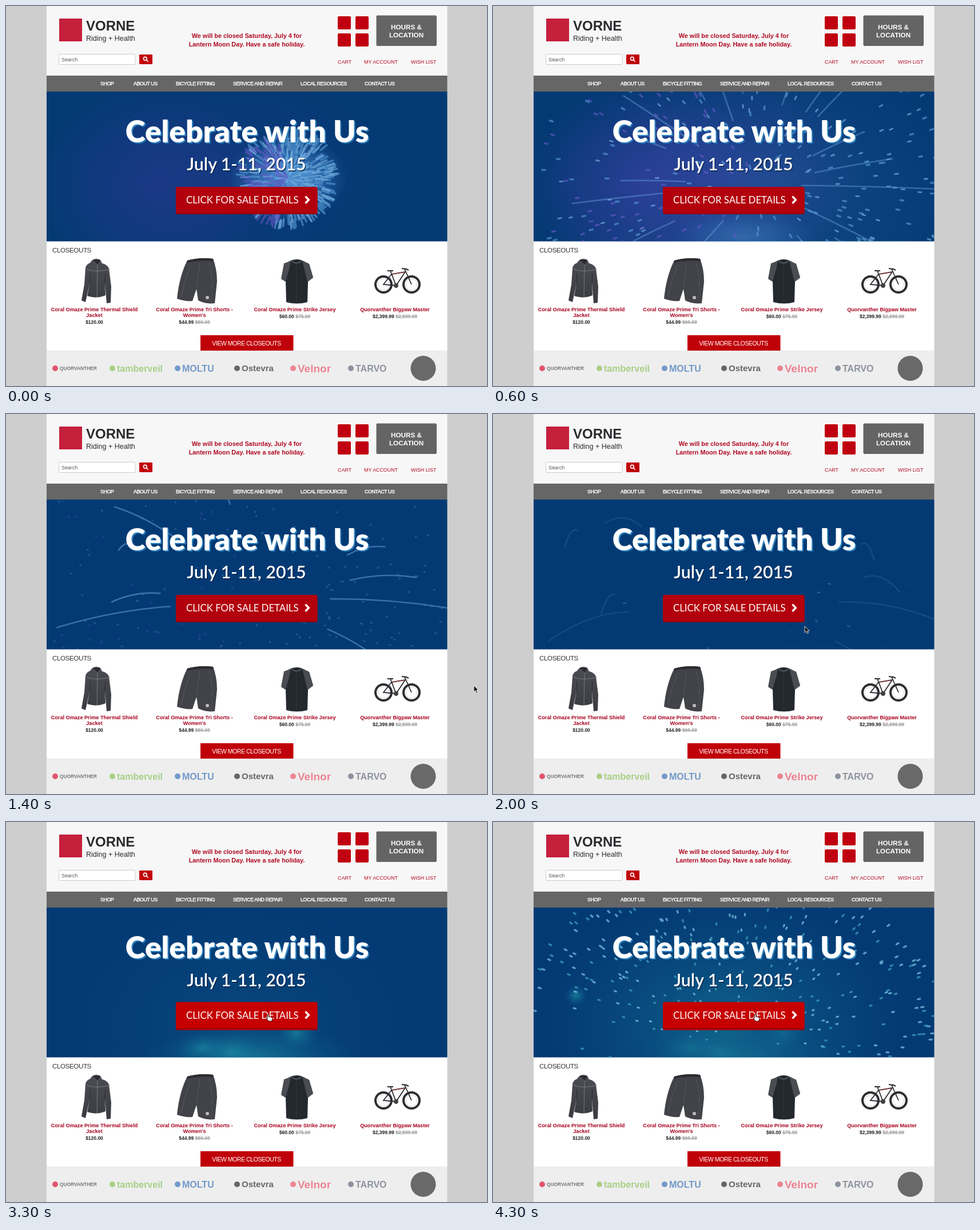
An HTML page for the animation above (4.4 s loop, 841 by 666 pixels).

```html
<!DOCTYPE html>
<html lang="en">
<head>
<meta charset="utf-8">
<title>Shop page</title>
<style>
html, body { margin: 0; width: 100%; height: 100%; overflow: hidden; background: #cecece; }
svg { display: block; position: absolute; left: 0; top: 0; }
text { font-family: "Liberation Sans", Arial, sans-serif; white-space: pre; }
.mid { text-anchor: middle; }
.b { font-weight: 700; }
.red { fill: #b00a22; }
.link { font-size: 8.9px; fill: #b00a22; }
.nav { font-size: 8.9px; letter-spacing: -.45px; fill: #fff; stroke: #fff; stroke-width: .4px; }
.item { font-size: 9.15px; font-weight: 700; fill: #a8001c; text-anchor: middle; }
.price { font-size: 8.5px; font-weight: 700; fill: #222; text-anchor: middle; }
.old { fill: #999; text-decoration: line-through; }
.lato { font-family: Lato, "Open Sans", sans-serif; }
.title { font-size: 53.1px; font-weight: 900; text-anchor: middle; }
.date { font-size: 30.3px; font-weight: 600; text-anchor: middle; }
#fire path { fill: none; stroke-linecap: round; }
</style>
</head>
<body>
<svg width="841" height="666" viewBox="0 0 841 666">
  <defs>
    <clipPath id="hero"><rect x="71" y="150" width="700.5" height="262.5"/></clipPath>
    <radialGradient id="gBlue"><stop offset="0" stop-color="#5a9ade"/><stop offset=".5" stop-color="#4585cc" stop-opacity=".65"/><stop offset="1" stop-color="#2f6fb8" stop-opacity="0"/></radialGradient>
    <radialGradient id="gViolet"><stop offset="0" stop-color="#4236a6"/><stop offset=".55" stop-color="#38379c" stop-opacity=".65"/><stop offset="1" stop-color="#303a94" stop-opacity="0"/></radialGradient>
    <radialGradient id="gTeal"><stop offset="0" stop-color="#1f93a8"/><stop offset=".5" stop-color="#15789a" stop-opacity=".55"/><stop offset="1" stop-color="#0d5f8c" stop-opacity="0"/></radialGradient>
    <linearGradient id="cloth" x2="0" y2="1"><stop offset="0" stop-color="#4b4d53"/><stop offset="1" stop-color="#3a3b41"/></linearGradient>
  </defs>

  <rect width="841" height="666" fill="#cecece"/>
  <rect x="71" width="700.5" height="122" fill="#f7f7f7"/>
  <rect x="71" y="122" width="700.5" height="28" fill="#666"/>
  <rect x="71" y="412" width="700.5" height="192" fill="#fff"/>
  <rect x="71" y="603.5" width="700.5" height="63" fill="#eee"/>

  <!-- header -->
  <rect x="93" y="22" width="40" height="40" fill="#c4203c"/>
  <text class="b" x="140" y="43" font-size="24" fill="#2b2b2f">VORNE</text>
  <text x="140" y="61" font-size="12.5" fill="#2b2b2f">Riding + Health</text>
  <rect x="92.5" y="84.5" width="133.5" height="18" rx="1" fill="#fff" stroke="#ccc"/>
  <text x="97" y="97" font-size="8.9" fill="#555">Search</text>
  <rect x="233" y="85" width="23" height="17" rx="1" fill="#c00008"/>
  <g fill="none" stroke="#fff" stroke-width="1.6"><circle cx="243.3" cy="92.3" r="2.9"/><path d="M245.5 94.5l3.2 3.2"/></g>
  <text class="b mid red" x="421" y="55.5" font-size="10.85">We will be closed Saturday, July 4 for</text>
  <text class="b mid red" x="421" y="70.5" font-size="10.85">Lantern Moon Day. Have a safe holiday.</text>
  <g fill="#c00010">
    <rect x="580" y="18" width="23" height="23" rx="2"/><rect x="611" y="18" width="23" height="23" rx="2"/>
    <rect x="580" y="48" width="23" height="23" rx="2"/><rect x="611" y="48" width="23" height="23" rx="2"/>
  </g>
  <rect x="647.5" y="16.5" width="105.5" height="53.5" rx="2" fill="#646464"/>
  <g class="b mid" font-size="11.7" fill="#fff"><text x="700" y="40.5">HOURS &amp;</text><text x="700" y="54.5">LOCATION</text></g>
  <text class="link" x="580" y="101">CART</text>
  <text class="link" x="626" y="101">MY ACCOUNT</text>
  <text class="link" x="708" y="101">WISH LIST</text>
  <g id="nav"></g>

  <!-- banner -->
  <g clip-path="url(#hero)">
    <rect x="71" y="150" width="701" height="263" fill="#043a74"/>
    <g id="fire"></g>
  </g>
  <text class="lato title" x="423.5" y="241" fill="#2f82bd">Celebrate with Us</text>
  <text class="lato title" x="421.5" y="238.5" fill="#fff">Celebrate with Us</text>
  <text class="lato date" x="422" y="290" fill="#06254d" opacity=".75">July 1-11, 2015</text>
  <text class="lato date" x="420.5" y="288" fill="#fff">July 1-11, 2015</text>
  <rect id="base" x="297" width="247.5" rx="3"/>
  <rect id="face" x="297" width="247.5" rx="3"/>
  <g id="label">
    <text class="lato" x="315" y="346" font-size="16.8" fill="#fff">CLICK FOR SALE DETAILS</text>
    <path d="M523.5 333.700l5.800 6l-5.800 6" fill="none" stroke="#fff" stroke-width="3.4"/>
  </g>

  <!-- products -->
  <text x="81" y="432" font-size="11.6" letter-spacing="-.4" fill="#333">CLOSEOUTS</text>
  <g>
    <path d="M151 445q7-4 14 0l3 6q9 2 12 9l4 32-1 28-7 1-3-36 1 22q-15 7-32 1l4-22-7 33-7-3 5-28 2-29q1-6 8-9z" fill="url(#cloth)"/>
    <path d="M152 445l8 8 5-8" fill="#292a2f"/>
    <path d="M140 461q18 7 42 0M160 453l-1 57" fill="none" stroke="#85868b" stroke-width=".8"/>
    <path d="M147 468l-1 18M174 468l-1 18" fill="none" stroke="#2c2d32"/>
  </g>
  <g>
    <path d="M317 446q22-6 45-3q7 18 7 40l-4 38q-16 2-29-5l-3-20-7 21q-14 1-27-4q4-40 18-67z" fill="#424348"/>
    <path d="M317 446q22-6 45-3l1 4q-24-2-47 3z" fill="#2c2d32"/>
    <path d="M333 495l6-45M356 450q7 30 3 68M322 455q-10 28-16 56" fill="none" stroke="#5a5b61" stroke-width=".8"/>
    <circle cx="352" cy="511" r="3" fill="#bbb"/>
  </g>
  <g>
    <path d="M498 446q11-4 20 0l12 6 7 24-9 7-1 36q-18 5-37 0l-1-36-7-4 5-27z" fill="#24282f"/>
    <path d="M498 447l-12 4-5 27 8 4 6-20zM518 447l12 5 7 24-10 7-5-21z" fill="#4a4c52"/>
    <path d="M499 447q9 7 18 0" fill="none" stroke="#56585e" stroke-width="2"/>
    <path d="M508 452v66" stroke="#353a42" stroke-width=".8"/>
  </g>
  <g fill="none" stroke="#2c2d31">
    <g stroke-width="4"><circle cx="660" cy="488" r="14"/><circle cx="709" cy="488" r="14"/></g>
    <g stroke="#aaa" stroke-width=".5"><circle cx="660" cy="488" r="10"/><circle cx="709" cy="488" r="10"/></g>
    <path d="M660 488l14-18 24-4-16 24zM672 464l10 26M697 461l12 27" stroke-width="1.8"/>
    <path d="M675 470l23-4" stroke="#a33" stroke-width="1"/>
    <path d="M667 464h10M692 460l8 1 4 2" stroke-width="2.2"/>
    <circle cx="682" cy="490" r="3.5" fill="#444"/>
  </g>
  <text class="item" x="154.5" y="534.5">Coral Omaze Prime Thermal Shield</text>
  <text class="item" x="154.5" y="545">Jacket</text>
  <text class="price" x="154.5" y="557">$120.00</text>
  <text class="item" x="329.5" y="534.5">Coral Omaze Prime Tri Shorts -</text>
  <text class="item" x="329.5" y="545">Women's</text>
  <text class="price" x="329.5" y="557">$44.99 <tspan class="old">$60.00</tspan></text>
  <text class="item" x="505" y="534.5">Coral Omaze Prime Strike Jersey</text>
  <text class="price" x="505" y="547">$60.00 <tspan class="old">$75.00</tspan></text>
  <text class="item" x="680" y="534.5">Quorvanther Bigpaw Master</text>
  <text class="price" x="680" y="547">$2,399.99 <tspan class="old">$2,599.99</tspan></text>
  <rect x="340" y="577" width="162.5" height="27" fill="#c00008"/>
  <text class="mid" x="420.5" y="595" font-size="10.6" letter-spacing="-.5" fill="#fff">VIEW MORE CLOSEOUTS</text>
  <g id="brands"></g>
  <circle cx="729.5" cy="635" r="22" fill="#696969"/>

  <!-- pointer -->
  <path id="arrow" d="M0 0v11l2.600-2.400 1.900 4.200 2-.9-1.900-4h3.500z" fill="#111" stroke="#fff" stroke-width=".8"/>
  <path id="hand" d="M-1.500-5q1.300-1 2.200.3v3.900l5 1.200q1.300.5 1 2.300l-1 4.300h-5.500l-4-5q.3-1.500 2.300-.2z" fill="#fff" stroke="#111" stroke-width=".9"/>
</svg>
<script>
const LOOP = 4400, STEP = 100, TAU = Math.PI * 2;
const $ = id => document.getElementById(id);

function set(el, attrs) {
  for (const k in attrs) el.setAttribute(k, attrs[k]);
}

function add(parent, name, attrs, text) {
  const el = document.createElementNS("http://www.w3.org/2000/svg", name);
  set(el, attrs);
  if (text) el.textContent = text;
  return parent.appendChild(el);
}

// Piecewise linear value from time, value pairs.
function key(t, ...k) {
  if (t <= k[0]) return k[1];
  for (let i = 2; i < k.length; i += 2) {
    if (t <= k[i]) return k[i - 1] + (k[i + 1] - k[i - 1]) * (t - k[i - 2]) / (k[i] - k[i - 2]);
  }
  return k[k.length - 1];
}

let seed = 2024;
const rnd = () => (seed = (seed * 16807) % 2147483647) / 2147483647;

[["SHOP", 165], ["ABOUT US", 223], ["BICYCLE FITTING", 297], ["SERVICE AND REPAIR", 397],
 ["LOCAL RESOURCES", 515], ["CONTACT US", 627]]
  .forEach(([s, x]) => add($("nav"), "text", { class: "nav", x, y: 138.5 }, s));

[["QUORVANTHER", 81, 8.4, "#e0566c", "#777"], ["tamberveil", 181, 16, "#a9cf86", "#a9cf86"],
 ["MOLTU", 295, 16, "#7299c8", "#7299c8"], ["Ostevra", 399, 15, "#666", "#666"],
 ["Velnor", 497, 19, "#ee8493", "#ee8493"], ["TARVO", 598, 16, "#8d939d", "#8d939d"]]
  .forEach(([s, x, size, mark, ink]) => {
    add($("brands"), "circle", { cx: x + 5, cy: 635, r: 5, fill: mark });
    add($("brands"), "text", { x: x + 13, y: 635 + size * .36, "font-size": size, fill: ink, class: "b" }, s);
  });

const fire = $("fire");
const glow = (cx, cy, rx, ry, id) => add(fire, "ellipse", { cx, cy, rx, ry, fill: `url(#${id})` });
const layer = (stroke, width) => add(fire, "path", { stroke, "stroke-width": width });

const violet = [glow(265, 315, 205, 180, "gViolet"), glow(420, 290, 230, 180, "gViolet")];
const core = glow(492, 302, 105, 80, "gBlue");
const haze = glow(470, 330, 380, 260, "gBlue");
const under = glow(440, 405, 130, 50, "gBlue");
const teal = glow(405, 355, 320, 230, "gTeal");
const low = [[430, 412, 190, 62], [345, 396, 50, 28], [508, 370, 38, 30], [395, 403, 55, 34]]
  .map(e => glow(...e, "gTeal"));
const leftPuff = glow(145, 304, 20, 18, "gTeal");
const dust = [layer("#5599d4", 3.5), layer("#79b2e0", 2.8), layer("#5f58c4", 3.5)];
const streaks = layer("#6ba5da", 2.6);
const embers = layer("#7fb0dc", 2);
const sparks = [layer("#7cc6e6", 3.2), layer("#3fa3bd", 3.2)];

const burst = Array.from({ length: 560 }, () => {
  const a = rnd() * TAU, s = Math.sqrt(rnd()) * 1.1;
  const kind = Math.cos(a) < -.2 && rnd() < .55 ? 2 : rnd() < .35 ? 1 : 0;
  return { a, s, kind };
});
const rays = Array.from({ length: 22 }, (_, i) =>
  ({ a: (i + rnd() * .7) / 22 * TAU, from: .75 + rnd() * .9, to: .7 + rnd() * .45 }));
const bloom = Array.from({ length: 380 }, () => {
  const a = rnd() < .75 ? -rnd() * Math.PI * 1.05 + .25 : rnd() * TAU;
  return { a, s: .1 + Math.pow(rnd(), .65), kind: rnd() < .6 ? 0 : 1 };
});

// A short radial dash whose head lies at radius r.
function dash(cx, cy, a, r, len, drop) {
  const c = Math.cos(a), s = Math.sin(a), q = Math.max(0, r - len);
  return `M${(cx + c * q).toFixed(1)} ${(cy + s * q + drop).toFixed(1)}L${(cx + c * r + .1).toFixed(1)} ${(cy + s * r + drop).toFixed(1)}`;
}

function ray({ a, from, to }, t, cx, cy) {
  const r0 = from * key(t, 0, 40, .4, 90, .9, 130, 1.4, 155, 2.2, 220);
  const r1 = Math.max(r0 + 25, to * key(t, 0, 90, .4, 260, .9, 345, 1.4, 330, 2.2, 320));
  const at = (r, sag) => `${(cx + Math.cos(a) * r).toFixed(1)} ${(cy + Math.sin(a) * r + sag).toFixed(1)}`;
  const sag = 12 * t * t;
  return `M${at(r0, sag * .2)}Q${at((r0 + r1) / 2, sag * .1)} ${at(r1, sag)}`;
}

function drawFire(t) {
  const cx = key(t, 0, 492, .4, 465, .9, 448), cy = key(t, 0, 302, .9, 318);
  const spread = 82 + 345 * (1 - Math.exp(-t / .42));
  const len = 1 + 12 * Math.exp(-t * t / .35);
  const alpha = key(t, 0, .62, .4, .72, .9, .55, 1.4, .25, 2, .05, 2.4, 0);
  dust.forEach((p, kind) => set(p, {
    d: alpha ? burst.filter(b => b.kind === kind)
      .map(b => dash(cx, cy, b.a, b.s * spread, len, 8 * t * t)).join("") : "",
    opacity: alpha
  }));
  set(streaks, {
    d: rays.map(r => ray(r, t, cx, cy)).join(""),
    opacity: key(t, 0, 0, .4, .25, .9, .7, 1.4, .5, 1.9, .18, 2.4, 0)
  });
  set(embers, {
    d: burst.filter((b, i) => i % 30 === 0).map(b => dash(450, 270, b.a, b.s * 265, 4, 7 * t)).join(""),
    opacity: key(t, .9, 0, 1.5, .4, 2.6, .3, 3.1, 0)
  });
  violet.forEach((v, i) => set(v, { opacity: key(t, 0, i ? .12 : .35, .4, i ? .5 : .8, .9, .15, 1.4, 0) }));
  set(core, { opacity: key(t, 0, .9, .4, .12, .7, 0) });
  set(haze, { opacity: key(t, 0, 0, .4, .2, .9, .12, 1.4, 0) });
  set(under, { opacity: key(t, 0, 0, .4, .6, .9, .15, 1.3, 0) });

  const u = Math.max(0, t - 3.3);
  const reach = 375 * (1 - Math.exp(-u / .45));
  const shine = key(t, 3.3, 0, 3.6, .55, 4.3, .72);
  sparks.forEach((p, kind) => set(p, {
    d: u ? bloom.filter(b => b.kind === kind)
      .map(b => dash(425, 372, b.a, b.s * reach, 1 + 3 * b.s, 8 * u * u)).join("") : "",
    opacity: shine
  }));
  set(teal, { opacity: key(t, 3, 0, 3.3, .15, 3.8, .55, 4.3, .45) });
  low.forEach(e => set(e, { opacity: key(t, 2.9, 0, 3.3, .6, 3.8, .6, 4.3, .3) }));
  set(leftPuff, { opacity: key(t, 3.7, 0, 4.3, .7) });
}

function drawPointer(t) {
  const x = key(t, 1.3, 834, 1.4, 818, 1.7, 700, 2, 545, 2.3, 463, 2.6, 461, 3.3, 459);
  const y = key(t, 1.3, 490, 1.4, 476, 1.7, 430, 2, 372, 2.3, 344, 2.6, 343, 3.3, 342);
  const over = t >= 1.3 && x < 544 && y < 365;
  set($("arrow"), { transform: `translate(${x} ${y})`, visibility: t >= 1.3 && !over ? "visible" : "hidden" });
  set($("hand"), { transform: `translate(${x} ${y})`, visibility: over ? "visible" : "hidden" });
  set($("base"), { y: over ? 320 : 321, height: over ? 45 : 44, fill: over ? "#a0000c" : "#96000c" });
  set($("face"), { y: over ? 315.5 : 317, height: over ? 45.5 : 46, fill: over ? "#c60000" : "#b3000d" });
  set($("label"), { transform: `translate(0 ${over ? -1.5 : 0})` });
}

let shown = -1;
const start = performance.now();
function tick() {
  let t = Math.floor(((performance.now() - start) % LOOP) / STEP) * STEP;
  if (t < 200) t = 0;
  if (t !== shown) {
    shown = t;
    drawFire(t / 1000);
    drawPointer(t / 1000);
  }
  requestAnimationFrame(tick);
}
tick();
</script>
</body>
</html>
```
